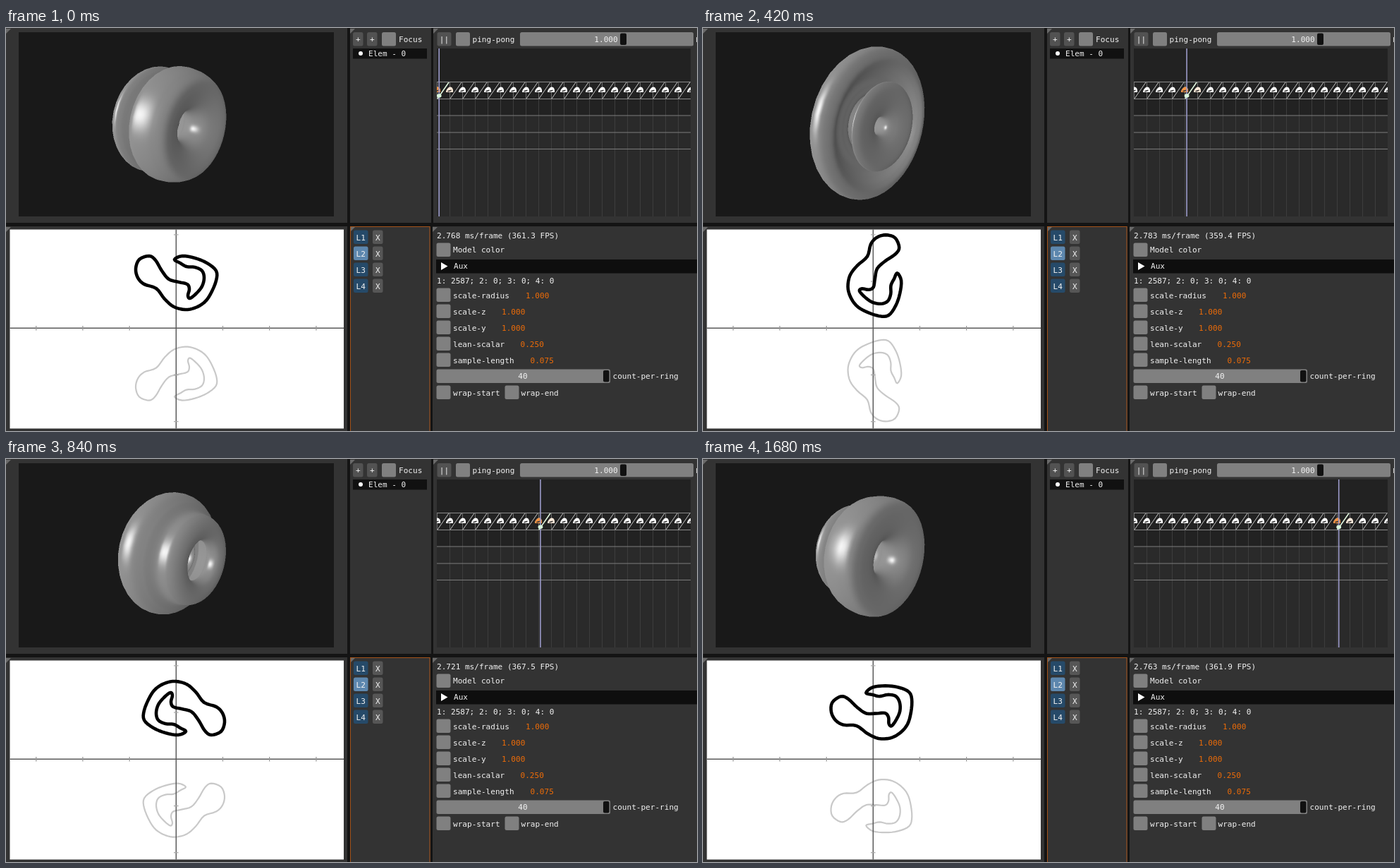
Recreate the animation shown at these times as an HTML page with a canvas. Size 980 by 571 pixels, loop 1.75 s.

```html
<!DOCTYPE html>
<html lang="en">
<head>
<meta charset="utf-8">
<title>Revolved profile editor</title>
<style>
  html, body { margin: 0; width: 100%; height: 100%; overflow: hidden; background: #141414; }
  svg { position: absolute; left: 0; top: 0; display: block; }
  canvas { position: absolute; left: 125px; top: 16px; width: 230px; height: 244px; }
  text { font: 11.07px "DejaVu Sans Mono", monospace; fill: #f2f2f2; }
  .num { fill: #ee6c08; }
  .mid { text-anchor: middle; }
</style>
</head>
<body>
<svg id="ui" width="980" height="571" viewBox="0 0 980 571">
  <defs>
    <clipPath id="track"><rect x="611" y="29" width="360" height="238"/></clipPath>
    <clipPath id="paper"><rect x="5.5" y="285.500" width="473.500" height="282"/></clipPath>
  </defs>
  <g id="base"></g>
  <g clip-path="url(#track)">
    <g id="keys"></g>
    <path id="cell" stroke="#dff5dc" stroke-width="1.5"/>
    <path id="head" stroke="#9c9bcb" stroke-width="1.6"/>
    <ellipse id="dot" rx="3.4" ry="2.7" fill="#d9f7dc"/>
  </g>
  <g clip-path="url(#paper)" fill="none" stroke-linejoin="round">
    <path id="mirror" stroke="#c9c9c9" stroke-width="2.2"/>
    <g id="axes"></g>
    <path id="curve" stroke="#000" stroke-width="4.6"/>
  </g>
  <text id="rate" x="611" y="298"></text>
</svg>
<canvas id="view" width="460" height="488"></canvas>
<script>
const $ = id => document.getElementById(id);
const STEP = 70, FRAMES = 25;

// ---------- static interface ----------
const rect = (x, y, w, h, fill, r = 0) =>
  `<rect x="${x}" y="${y}" width="${w}" height="${h}" rx="${r}" fill="${fill}"/>`;
const text = (x, y, s, cls = '') => `<text x="${x}" y="${y}" class="${cls}">${s}</text>`;
const box = (x, y) => rect(x, y, 20, 19.5, '#808080', 2.5);
const button = (x, y, w, s, fill) => rect(x, y, w, 19.5, fill, 2.5) + text(x + w / 2, y + 14, s, 'mid');
const line = (d, color, w = 1) => `<path d="${d}" stroke="${color}" stroke-width="${w}" fill="none"/>`;

function buildBase() {
  const panels = [[0, 0, 484, 276], [488, 0, 115, 276], [606, 0, 374, 276],
                  [0, 281, 484, 290], [488, 281, 114, 290], [605, 281, 375, 290]];
  let s = '';
  for (const [x, y, w, h] of panels)
    s += rect(x, y, w, h, '#333') + `<path d="M${x} ${y + 1}h7l-7 7z" fill="#6a6a6a"/>`;

  s += rect(18, 6, 447, 261, '#191919') + rect(5.5, 285.5, 473.5, 282, '#fff');
  s += '<rect x="488.5" y="281.5" width="112.5" height="292" fill="none" stroke="#a4531a"/>';

  s += button(492, 6, 14.5, '+', '#525252') + button(512, 6, 14.5, '+', '#525252');
  s += box(533, 6) + text(557, 20, 'Focus');
  s += rect(492, 29, 105, 14.5, '#111') + '<circle cx="503" cy="36" r="3" fill="#fff"/>' + text(514, 40, 'Elem - 0');

  s += button(611.5, 6, 20, '||', '#525252') + box(638, 6) + text(661.5, 20, 'ping-pong');
  s += rect(729, 6, 246, 19.5, '#808080', 2.5) + rect(871, 7.5, 9, 16.5, '#111', 2) + text(851, 20, '1.000', 'mid');
  s += rect(979, 13, 1, 7, '#ccc');

  s += rect(611, 29, 360, 238, '#222') + rect(611, 124, 360, 143, '#2a2a2a');
  for (let x = 629; x < 971; x += 18) s += line(`M${x}.5 100V267`, '#3d3d3d');
  for (const y of [124, 148, 171.5]) s += line(`M611 ${y}H971`, '#7c7c7c');

  ['L1', 'L2', 'L3', 'L4'].forEach((name, i) => {
    const y = 286.5 + 23 * i;
    s += button(493, y, 20.5, name, i === 1 ? '#5d87ae' : '#264a69') + button(520, y, 14.5, 'X', '#565656');
  });

  s += box(610.5, 304.5) + text(634, 318, 'Model color');
  s += rect(610, 328, 370, 19.5, '#0e0e0e') + '<path d="M617 332l9.500 5.500-9.500 5.500z" fill="#fff"/>' + text(635, 341, 'Aux');
  s += text(611, 362, '1: 2587; 2: 0; 3: 0; 4: 0');
  const fields = [['scale-radius', '1.000', 737], ['scale-z', '1.000', 703], ['scale-y', '1.000', 703],
                  ['lean-scalar', '0.250', 729.5], ['sample-length', '0.075', 743.5]];
  fields.forEach(([name, value, x], i) => {
    const y = 368.5 + 23 * i;
    s += box(610.5, y) + text(634, y + 14, name) + text(x, y + 14, value, 'num');
  });
  s += rect(610.5, 483.5, 246.5, 19.5, '#808080', 2.5) + rect(847, 485, 8.5, 16.5, '#111', 2);
  s += text(733, 497, '40', 'mid') + text(860.5, 497, 'count-per-ring');
  s += box(610.5, 506.5) + text(634, 521, 'wrap-start') + box(707.5, 506.5) + text(730.5, 521, 'wrap-end');
  $('base').innerHTML = s;
}

function buildAxes() {
  let s = line('M5 425.3H479M241.3 285V568', '#5a5a5a', 1.5);
  for (let i = -3; i <= 3; i++) if (i) s += line(`M${241.3 + 66.2 * i} 422v6.500`, '#999', 1.3);
  for (const i of [-2, -1, 1, 2]) s += line(`M238 ${425.3 + 66.2 * i}h6.500`, '#aaa', 1.3);
  $('axes').innerHTML = s;
}

const KEY0 = 611, GAP = 18, KEYS = 21;
const blob = 'M-5 3.500C-5 .5-2-3.800 1-4C4-3.800 5.500-1 5 3.500Z';
function buildKeys() {
  let s = line('M611 76.500H971M611 100.500H971', '#8a8a8a');
  for (let i = 0; i < KEYS; i++) {
    const x = KEY0 + GAP * i;
    s += line(`M${x + .5} 77V100`, '#6c6c6c') + line(`M${x + 1} 100L${x + GAP - 1} 77`, '#c4c4c4');
    s += `<g transform="translate(${x} 87.500)"><path d="${blob}" fill="#fff"/>` +
         `<path class="hot" d="${blob}" fill="#f07d1c"/>` + line('M-2.500 2.200L2.500 .8', '#333', 1.6) + '</g>';
  }
  $('keys').innerHTML = s;
}

// ---------- profile ----------
const C = [247, 357], AXIS_X = 241.3, AXIS_Y = 425.3;
const knots = [-8,-29, 3,-34, 21,-31, 38,-24, 51,-13, 51,1, 43,20, 34,32, 21,39.5, 7,42, -9,38,
  -22,27, -34,12, -51,6, -60,-3, -63,-16, -58,-29, -44,-34, -35,-28, -26,-13, -16,-1, -2,3,
  10,6, 13,13, 11,22, 14,26, 23,19, 31,9, 34,-3, 31,-13, 21,-18, 9,-19, 0,-24];
const SUB = 4;

// closed Catmull-Rom: position and tangent samples
const outline = (() => {
  const n = knots.length / 2, out = [];
  const k = (i, d) => knots[(i + n) % n * 2 + d];
  for (let i = 0; i < n; i++) for (let j = 0; j < SUB; j++) {
    const t = j / SUB, p = [];
    for (const d of [0, 1]) {
      const a = k(i - 1, d), b = k(i, d), c = k(i + 1, d), e = k(i + 2, d);
      const c1 = c - a, c2 = 2 * a - 5 * b + 4 * c - e, c3 = 3 * b - a - 3 * c + e;
      p[d] = b + t * (c1 + t * (c2 + t * c3)) / 2;
      p[d + 2] = (c1 + t * (2 * c2 + 3 * t * c3)) / 2;
    }
    out.push(p);
  }
  return out;
})();

function turned(deg) {
  const a = deg * Math.PI / 180, c = Math.cos(a), s = Math.sin(a);
  return outline.map(([x, y, tx, ty]) =>
    [C[0] + x * c - y * s, C[1] + x * s + y * c, tx * c - ty * s, tx * s + ty * c]);
}

// ---------- solid of revolution ----------
const RING = 40, W = 460, H = 488, FOCAL = 290, DIST = 375;
const EYE = [240, 136], CORNER = [125, 16];
const ctx = $('view').getContext('2d');
const image = ctx.createImageData(W, H);
const depth = new Float32Array(W * H);
const yaw = 44.5 * Math.PI / 180, pitch = 15 * Math.PI / 180;
const cy = Math.cos(yaw), sy = Math.sin(yaw), cp = Math.cos(pitch), sp = Math.sin(pitch);
const L = [-.82, .22, .53];
const hl = Math.hypot(L[0], L[1], L[2] + 1), HALF = [L[0] / hl, L[1] / hl, (L[2] + 1) / hl];

function toCamera(u, p, q) {
  const z = u * sy + q * cy;
  return [u * cy - q * sy, p * cp - z * sp, p * sp + z * cp];
}

function shade(x, y, z) {
  const m = 1 / (Math.hypot(x, y, z) || 1);
  const diff = (x * L[0] + y * L[1] + z * L[2]) * m;
  const spec = Math.max(0, (x * HALF[0] + y * HALF[1] + z * HALF[2]) * m);
  return 74 + 76 * (.5 + .5 * diff) + 100 * Math.pow(spec, 45);
}

function triangle(a, b, c) {
  const area = (b[0] - a[0]) * (c[1] - a[1]) - (b[1] - a[1]) * (c[0] - a[0]);
  if (!area) return;
  const x0 = Math.max(0, Math.ceil(Math.min(a[0], b[0], c[0])));
  const x1 = Math.min(W - 1, Math.floor(Math.max(a[0], b[0], c[0])));
  const y0 = Math.max(0, Math.ceil(Math.min(a[1], b[1], c[1])));
  const y1 = Math.min(H - 1, Math.floor(Math.max(a[1], b[1], c[1])));
  for (let y = y0; y <= y1; y++) for (let x = x0; x <= x1; x++) {
    const wb = ((x - a[0]) * (c[1] - a[1]) - (y - a[1]) * (c[0] - a[0])) / area;
    const wc = ((b[0] - a[0]) * (y - a[1]) - (b[1] - a[1]) * (x - a[0])) / area;
    const wa = 1 - wb - wc;
    if (wa < 0 || wb < 0 || wc < 0) continue;
    const mix = i => wa * a[i] + wb * b[i] + wc * c[i];
    const z = mix(2), i = y * W + x;
    if (z <= depth[i]) continue;
    depth[i] = z;
    const g = shade(mix(3), mix(4), mix(5)), o = i * 4;
    image.data[o] = image.data[o + 1] = image.data[o + 2] = g;
    image.data[o + 3] = 255;
  }
}

function drawSolid(profile) {
  image.data.fill(0);
  depth.fill(-1e9);
  const rings = profile.map(([x, y, tx, ty]) => {
    const u = x - AXIS_X, r = Math.max(.3, AXIS_Y - y), m = Math.hypot(tx, ty) || 1;
    return Array.from({ length: RING }, (_, j) => {
      const a = j / RING * 2 * Math.PI, c = Math.cos(a), s = Math.sin(a);
      const [X, Y, Z] = toCamera(u, r * s, r * c), k = FOCAL / (DIST - Z);
      return [2 * (EYE[0] + k * X - CORNER[0]), 2 * (EYE[1] - k * Y - CORNER[1]), Z,
              ...toCamera(ty / m, tx / m * s, tx / m * c)];
    });
  });
  rings.forEach((p, i) => {
    const q = rings[(i + 1) % rings.length];
    for (let j = 0; j < RING; j++) {
      const n = (j + 1) % RING;
      triangle(p[j], q[j], q[n]);
      triangle(p[j], q[n], p[n]);
    }
  });
  ctx.putImageData(image, 0, 0);
}

// ---------- animation ----------
const angles = [0, 55, 118, 180, 241, 290, 344];
const times = [2.768, 2.829, 2.736, 2.721, 2.727, 2.823, 2.763];
function at(list, f) {
  const i = Math.floor(f / 4), t = f % 4 / 4;
  return t ? list[i] + (list[i + 1] - list[i]) * t : list[i];
}

function draw(f) {
  const profile = turned(at(angles, f));
  const path = map => 'M' + profile.map(([x, y]) => x.toFixed(2) + ' ' + map(y).toFixed(2)).join('L') + 'Z';
  $('curve').setAttribute('d', path(y => y));
  $('mirror').setAttribute('d', path(y => 2 * AXIS_Y - y));
  drawSolid(profile);

  const x = 614.2 + 11.98 * f, pos = (x - KEY0) / GAP, k = Math.floor(pos), left = KEY0 + GAP * k;
  $('head').setAttribute('d', `M${x} 29V267`);
  $('cell').setAttribute('d', `M${left + 1} 100L${left + GAP - 1} 77`);
  $('dot').setAttribute('cx', x);
  $('dot').setAttribute('cy', 100 - 23 * (pos - k));
  hot.forEach((el, i) => el.setAttribute('opacity', Math.max(0, 1 - Math.abs(i - pos))));

  const ms = at(times, f);
  $('rate').textContent = `${ms.toFixed(3)} ms/frame (${(1000 / ms).toFixed(1)} FPS)`;
}

buildBase();
buildAxes();
buildKeys();
const hot = [...document.querySelectorAll('.hot')];
const start = performance.now();
let shown = -1;
function tick() {
  const f = Math.floor((performance.now() - start) / STEP) % FRAMES;
  if (f !== shown) draw(shown = f);
  requestAnimationFrame(tick);
}
tick();
</script>
</body>
</html>
```
